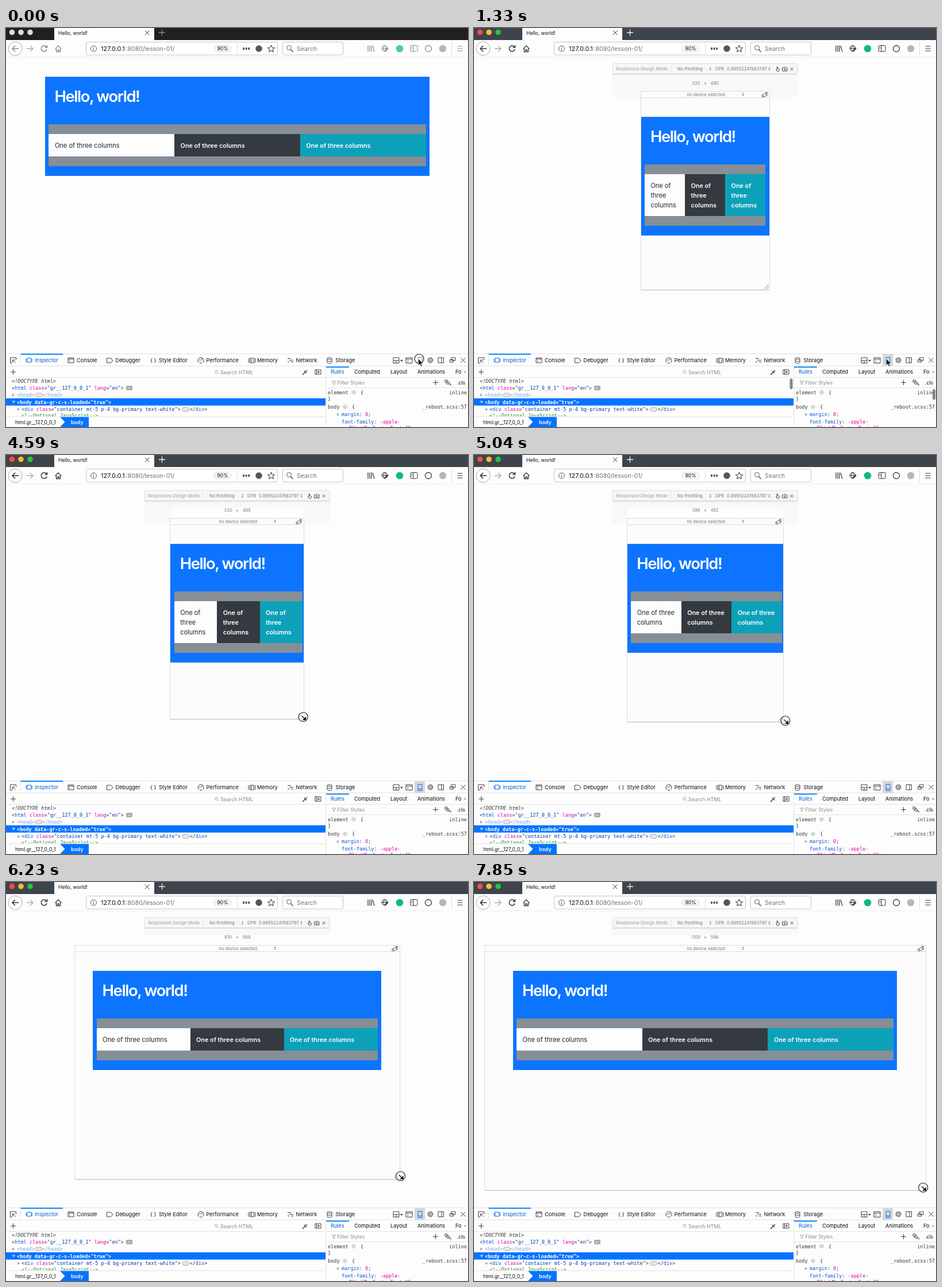
These frames come from a looping animation (804x696 px, 8000 ms). An HTML page:

```html
<!DOCTYPE html>
<html lang="en">
<head>
<meta charset="utf-8">
<title>Responsive design mode</title>
<style>
html, body { margin: 0; width: 100%; height: 100%; overflow: hidden; background: #fdfdfd; }
#stage { display: block; width: 804px; height: 696px; }
text { font: 9.2px Inter, sans-serif; white-space: pre; fill: #0c0c0d; }
.mono text { font: 8.53px "DejaVu Sans Mono", monospace; fill: #38383d; }
.mono .b { font-weight: 700; fill: #fff; }
.i { fill: none; stroke: currentColor; stroke-width: 1; stroke-linejoin: round; }
.f { fill: currentColor; stroke: none; }
.tag { fill: #0a52d9; }
.attr { fill: #dd00a9; }
.val { fill: #003eaa; }
.dim { opacity: .5; }
.grey { fill: #8a8a8d; }
.url text { font-size: 10.5px; }
#rdm text { font-size: 7.5px; fill: #77777a; }
#page text { font-size: 10.8px; fill: #fff; font-weight: 600; }
#page .lead { font-size: 27.4px; letter-spacing: -1.4px; font-optical-sizing: none; }
#page .ink { font-size: 11.05px; fill: #212529; font-weight: 400; }
</style>
</head>
<body>
<svg id="stage" viewBox="0 0 804 696">
  <rect width="804" height="696" fill="#fdfdfd"/>

  <!-- title bar -->
  <rect id="bar" width="804" height="21"/>
  <rect x="84" width="174" height="21" fill="#fdfdfd"/>
  <g id="lights">
    <circle cx="10.5" cy="7.5" r="4.8"/><circle cx="26" cy="7.5" r="4.8"/><circle cx="42" cy="7.5" r="4.8"/>
  </g>
  <text x="91" y="11.8" style="font-size:8.6px">Hello, world!</text>
  <path class="i" color="#333" d="M242 4.5l7.5 7.5m0-7.5L242 12"/>
  <path id="plus" fill="none" stroke-width="1.3" d="M271.5 2.5v11M266 8h11"/>

  <!-- navigation bar -->
  <path d="M0 50.5H804" stroke="#efefef"/>
  <g class="i">
    <g stroke="#c4c4c6">
      <rect x="139.5" y="24.5" width="333" height="22.5" rx="2.5" fill="#fff"/>
      <rect x="481.5" y="24.5" width="105" height="22.5" rx="2.5" fill="#fff"/>
      <path d="M402.5 27v18M775.5 24v24" stroke="#ddd"/>
      <rect x="361.5" y="30" width="30.5" height="11.5" rx="5.7" fill="#f5f5f6" stroke="#e0e0e2"/>
      <circle cx="16" cy="36" r="12" fill="#fff" stroke="#a8a8aa"/>
    </g>
    <path d="M36 36h11m-5-5l5 5-5 5" stroke="#ababad" stroke-width="1.3"/>
    <g color="#555">
      <circle cx="152.5" cy="36" r="5"/><path d="M152.5 35v4M152.5 32.8v1.2"/>
      <path class="f" d="M412 36a1.6 1.6 0 1 0 3 0a1.6 1.6 0 1 0-3 0m4.6 0a1.6 1.6 0 1 0 3 0a1.6 1.6 0 1 0-3 0m4.6 0a1.6 1.6 0 1 0 3 0a1.6 1.6 0 1 0-3 0"/>
      <circle class="f" cx="440" cy="36" r="5.8"/>
      <path d="M461.5 30l1.8 4 4.3.4-3.3 2.9 1 4.3-3.8-2.3-3.8 2.3 1-4.3-3.3-2.9 4.3-.4z" stroke-width="1.2"/>
      <circle cx="492.5" cy="34.5" r="4"/><path d="M495.5 37.5l4 4.5" stroke-width="1.5"/>
    </g>
    <g id="tools">
      <path d="M22 36H11m5-5l-5 5 5 5" stroke-width="1.6"/>
      <path d="M70.4 33a5 5 0 1 0 .7 4.2M71.5 30v4h-4" stroke-width="1.5"/>
      <path d="M85.5 36.5l5.5-5.5 5.5 5.5M87.5 36v5.5h2.5v-3.5h2v3.5h2.5V36" stroke-width="1.3"/>
      <path d="M630 30.5v11M633 30.5v11M636 30.5v11M638 31l3 10.5" stroke-width="1.2"/>
      <circle cx="659" cy="35.5" r="5"/><path d="M654 35.5h10M659 30.5c-3 3-3 7 0 10M659 30.5c3 3 3 7 0 10"/><path d="M659 41l6-6" stroke-width="2"/>
      <rect x="704" y="30.5" width="12" height="10.5" rx="1.5"/><path d="M709 30.5v10.5M705.5 33.5h2M705.5 36h2"/>
      <circle cx="735" cy="36" r="5.5" stroke-width="1.3"/>
      <path d="M785.5 32h9M785.5 36h9M785.5 40h9" stroke-width="1.2"/>
    </g>
  </g>
  <circle id="green" cx="685" cy="36" r="6.3" fill="#10b981"/>
  <circle cx="760" cy="36" r="6.2" fill="#b6b6b8"/>
  <g class="url">
    <text x="165" y="39.8" style="font-size:11px">127.0.0.1</text>
    <text x="208.5" y="39.8" style="fill:#6f6f72">:8080/lesson-01/</text>
    <text x="377" y="39" text-anchor="middle" style="font-size:8.5px">90%</text>
    <text x="506" y="39.8" style="fill:#737376">Search</text>
  </g>

  <!-- responsive toolbar -->
  <rect id="ghost" x="68" y="85" width="669" height="483"/>
  <g id="rdm">
    <rect x="241" y="80" width="322.5" height="40.5" fill="#f8f8f8"/>
    <rect id="wipe" y="93" height="28" fill="#fdfdfd"/>
    <rect x="241" y="80" width="322.5" height="2" fill="#e6e6e6"/>
    <rect x="241.5" y="62" width="321.5" height="17.5" rx="1" fill="#f7f7f8" stroke="#dcdcde"/>
    <path d="M342.5 65.5v11" stroke="#ddd"/>
    <text x="247" y="74" style="fill:#9b9b9e">Responsive Design Mode</text>
    <text x="354" y="74">No throttling</text>
    <text x="420" y="74">DPR</text>
    <text x="440" y="74" style="font-size:7.7px">0.89552241563797</text>
    <g class="f" color="#777"><path d="M409.7 70.5l1.6-2.2 1.6 2.2zM409.7 72l1.6 2.2 1.6-2.2zM512.4 70.5l1.6-2.2 1.6 2.2zM512.4 72l1.6 2.2 1.6-2.2z"/></g>
    <g class="i" color="#4a4a4e" stroke-width=".9">
      <path d="M527 73v-5h1.5v3l3 .8v1.7l-1 2h-3l-2-3z"/>
      <path d="M536.5 69.5h2l1-1h3l1 1h1.5v5.5h-8.5z"/><circle cx="540.8" cy="72" r="1.4"/>
      <path d="M550.5 69l5 5m0-5l-5 5"/>
    </g>
    <g text-anchor="middle">
      <text id="wide" x="386.5" y="99"></text><text x="402.5" y="99">×</text><text id="high" x="418.7" y="99"></text>
    </g>
    <rect id="frame" y="110.5" fill="#fcfcfc" stroke="#dcdcde"/>
    <path id="edges" fill="none" stroke="#dcdcde"/>
    <path id="shade" stroke="#d0d0d2" stroke-width="1.6"/>
    <text x="403.7" y="119" text-anchor="middle">no device selected</text>
    <path class="f" color="#777" d="M466.6 115l1.6-2.2 1.6 2.2zM466.6 116.5l1.6 2.2 1.6-2.2z"/>
    <g id="turn" class="i" color="#66666a"><rect x="-3.5" y="-1" width="6" height="4" transform="rotate(-20)"/><path d="M0-3h4v5M-5 0v4h3M2-4.5l3 1.5"/></g>
  </g>
  <svg id="view"><g id="page"></g></svg>
  <path id="grip" class="i" color="#8a8a8d" d="M-8 0l8-8M-4 0l4-4"/>

  <!-- developer tools -->
  <rect y="568" width="804" height="128" fill="#fdfdfd"/>
  <path d="M0 568.5H804M0 589.5H804M0 609.5H555M557 609.5H804M557 627.5H804M556.5 590V696" stroke="#e2e2e4"/>
  <rect x="25.5" y="568" width="73.5" height="2" fill="#0a84ff"/>
  <rect x="557" y="590.5" width="40" height="2" fill="#0a84ff"/>
  <path d="M25.5 572v15" stroke="#e2e2e4"/>
  <rect id="hover" x="711" y="569" width="18" height="21" fill="#d5d8dc"/>
  <text x="50" y="583" style="fill:#0060df">Inspector</text>
  <text x="123" y="583">Console</text>
  <text x="190.5" y="583">Debugger</text>
  <text x="251" y="583">{ }</text>
  <text x="266" y="583">Style Editor</text>
  <text x="348.5" y="583">Performance</text>
  <text x="437" y="583">Memory</text>
  <text x="504.5" y="583">Network</text>
  <text x="573.5" y="583">Storage</text>
  <g class="i" color="#3c3c40">
    <path d="M11 584.5H7.5v-9.5h10v4M11.5 579l5 5m-5-5v4m0-4h4"/>
    <path d="M36.5 576h7.5v7h-7.5zM34 578.5h2.5M44 578.5h2.5M34 581h2.5M44 581h2.5" stroke="#0060df"/>
    <path d="M108 575.5h10v8.5h-10zM108 577.5h10M110 579.5l1.5 1.5-1.5 1.5"/>
    <path d="M175.5 576h7l3.5 4-3.5 4h-7z"/>
    <path d="M342.5 583.5a5 5 0 1 0-7 0M339 580l3-4M336 579h2M337 584.5h4"/>
    <path d="M424.5 576h7v8h-7zM422 576v8M434 576v8M427 577v6"/>
    <path d="M490 576.5h6M493 579.5h7M490 582.5h3M496 582.5h4"/>
    <path d="M559 576.5c0-2 8-2 8 0v7c0 2-8 2-8 0zM559 576.5c0 2 8 2 8 0M559 580c0 2 8 2 8 0"/>
    <path d="M674 575h10v9.5h-10zM674 580h10M679 580v4.5"/><path class="f" d="M686 579h5l-2.5 3z"/>
    <path d="M696 575h11v9.5h-11zM696 577.5h11M698.5 579.5l1.5 1.5-1.5 1.5"/>
    <circle cx="738.5" cy="579.5" r="3.7"/><circle cx="738.5" cy="579.5" r="1.5"/>
    <circle cx="738.5" cy="579.5" r="4.7" stroke-dasharray="1.8 1.89"/>
    <path d="M752 575h9.5v9h-9.5zM758 575v9"/>
    <path d="M775 575h7v5h-7zM772.5 578.5h6v4.5h-6z"/>
    <path d="M791.5 575.5l8 8m0-8l-8 8"/>
    <path d="M12.5 595.5v9M8 600h9M747.5 614v9M743 618.5h9"/>
    <path d="M516 605l5-5M519 598l4 4M522 599l2-2" stroke-width="1.5"/>
    <path d="M538 596h10v8h-10zM540.5 596v8M543 598l3 2-3 2z"/>
    <path d="M764 614h4v4h-4zM767 617h4v4h-4zM770 621h4v3"/>
    <g color="#a5a5a8"><circle cx="366" cy="599.5" r="2.5"/><path d="M368 601.5l2 2M567 616h7l-2.5 3v3l-2-1v-2z"/>
      <circle cx="605" cy="635.5" r="3.5" stroke-dasharray="1.5 1.2"/><circle cx="605" cy="635.5" r="1.8"/>
      <circle cx="590" cy="661" r="3.5" stroke-dasharray="1.5 1.2"/><circle cx="590" cy="661" r="1.8"/>
      <path class="f" d="M796.5 599h5l-2.5 3zM11 637.5v5.5l4-2.7zM20 662.5v5.5l4-2.7zM576 671.5v5.5l4-2.7z"/></g>
  </g>
  <path id="phone" class="i" d="M717 574.5h7v11h-7zM717 582.5h7M720 584h1"/>
  <text class="grey" x="373" y="603.5" style="font-size:8.9px">Search HTML</text>
  <text x="565" y="603.3" style="fill:#0060df">Rules</text>
  <text x="606" y="603.3">Computed</text>
  <text x="669" y="603.3">Layout</text>
  <text x="716" y="603.3">Animations</text>
  <text x="782" y="603.3">Fo</text>
  <text class="grey" x="576.5" y="622" style="font-size:8.6px">Filter Styles</text>
  <text x="785" y="621.5" style="font-size:8.6px">.cls</text>

  <g class="mono">
    <rect y="646" width="556" height="12.6" fill="#0573ff"/>
    <path d="M10 650.5h6.5l-3.2 4.5z" fill="#9cc8ff"/>
    <text x="10" y="619" style="font-style:italic">&lt;!DOCTYPE html&gt;</text>
    <text x="10" y="631">&lt;<tspan class="tag">html</tspan> <tspan class="attr">class</tspan>="<tspan class="val">gr__127_0_0_1</tspan>" <tspan class="attr">lang</tspan>="<tspan class="val">en</tspan>"&gt;</text>
    <rect x="209" y="624" width="11" height="8" rx="2" fill="#a9a9ac"/>
    <text x="211.5" y="630" style="font-size:5px;fill:#fff">ev</text>
    <g class="dim">
      <text x="19" y="643">&lt;<tspan class="tag">head</tspan>&gt;</text>
      <text x="63" y="643">&lt;/<tspan class="tag">head</tspan>&gt;</text>
    </g>
    <text class="b" x="19" y="655.5">&lt;body data-gr-c-s-loaded="true"&gt;</text>
    <text x="27" y="668">&lt;<tspan class="tag">div</tspan> <tspan class="attr">class</tspan>="<tspan class="val">container mt-5 p-4 bg-primary text-white</tspan>"&gt;</text>
    <text x="319.5" y="668">&lt;/<tspan class="tag">div</tspan>&gt;</text>
    <g fill="#f4f4f5" stroke="#8a8a8d" stroke-width=".8">
      <rect x="51.5" y="637" width="11" height="6.5" rx="3"/><rect x="307" y="662" width="11" height="6.5" rx="3"/>
      <path d="M54 640.3h6M309.5 665.3h6" stroke-dasharray="1.2 1.2"/>
    </g>
    <text x="27" y="679.3" style="fill:#2a8a1d">&lt;!--Optional JavaScript--&gt;</text>
    <rect y="677.5" width="555" height="19" fill="#fdfdfd"/>
    <path d="M0 678H555" stroke="#e2e2e4"/>
    <text x="560" y="638.5">element</text><text x="617" y="638.5">{</text>
    <text x="802" y="638.5" text-anchor="end">inline</text>
    <text x="560" y="649.5">}</text>
    <text x="560" y="664">body</text><text x="602" y="664">{</text>
    <text x="802" y="664" text-anchor="end">_reboot.scss:57</text>
    <text x="584" y="677"><tspan class="tag">margin</tspan>: <tspan class="attr">0</tspan>;</text>
    <text x="584" y="689.5"><tspan class="tag">font-family</tspan>: <tspan class="attr">-apple-</tspan></text>
    <text x="597" y="700.5" style="fill:#dd00a9">BlinkMacSystemFont,"S</text>
  </g>
  <text x="16" y="690.7" style="font-size:8.5px">html.gr__127_0_0_1</text>
  <path d="M94 678.5h50V696H94l8.5-8.8z" fill="#0573ff"/>
  <text x="113" y="690.7" style="font-size:8.8px;font-weight:600;fill:#fff">body</text>
  <g id="bars" fill="#85858a">
    <rect x="549.5" y="611.5" width="5" height="18.5" rx="2.5"/><rect x="798" y="630" width="5" height="18.5" rx="2.5"/>
  </g>

  <!-- pointer -->
  <circle id="ring" r="8" fill="#fff" fill-opacity=".4" stroke="#111" stroke-width="1.1"/>
  <path id="arrow" d="M0 0v11.5l2.7-2.5 2 4.4 2-.9-2-4.3h3.7z" fill="#000" stroke="#fff" stroke-width=".8"/>
  <path id="sizer" d="M-2.5-2L4 4.5M4.5 .5v4.500h-4.500z" fill="#000" stroke="#000" stroke-width="1.1"/>
</svg>

<script>
const LOOP = 8000, STEP = LOOP / 54, S = 0.6965, MID = 402.1, LINE = 17;
const el = id => document.getElementById(id);
const set = (id, attrs) => { for (const a in attrs) el(id).setAttribute(a, attrs[a]); };
const show = (id, on) => set(id, { visibility: on ? "visible" : "hidden" });
const at = (id, x, y) => set(id, { transform: `translate(${x} ${y})` });

// device widths from step 29 on
const WIDTHS = [320, 322, 332, 348, 366, 388, 425, 473, 527, 592, 655, 712, 764,
  810, 850, 900, 947, 985, 1015, 1040, 1060, 1075, 1087, 1095, 1100];
// [step, value...]
const HEIGHTS = [[29, 480], [34, 492], [37, 522], [42, 568], [45, 583], [53, 596]];
const GRAB = [[29, -4, -4], [34, 4, -1.5], [37, 4, -4], [42, 1.5, -5], [45, -2, -5], [53, -4.3, -4]];
const PATH = [[0, 717.5, 577], [16, 717.5, 577], [17, 719, 578], [18, 721.5, 580.5], [19, 721.5, 580.5],
  [20, 724.5, 585], [21, 724.5, 585], [22, 721, 578], [23, 717, 570], [24, 695, 549],
  [25, 655, 520], [26, 608, 494], [27, 560, 473], [28, 525, 460], [29, 510, 453]];

function pick(keys, k) {
  let i = 0;
  while (i < keys.length - 2 && keys[i + 1][0] <= k) i++;
  const [a, b] = [keys[i], keys[i + 1]];
  const p = Math.min(1, Math.max(0, (k - a[0]) / (b[0] - a[0])));
  return a.slice(1).map((v, j) => v + (b[j + 1] - v) * p);
}

const widthAt = k => WIDTHS[Math.min(24, Math.max(0, k - 29))];

// rectangle with its sides snapped to whole pixels
function box(x, y, w, h, fill) {
  const l = Math.round(x), r = Math.round(x + w);
  return `<rect x="${l}" y="${y}" width="${r - l}" height="${h}" fill="${fill}"/>`;
}

// page laid out like a fixed-width grid container, in stage coordinates
function layout(left, y, css) {
  const cw = S * (css >= 992 ? 960 : css >= 768 ? 720 : css >= 576 ? 540 : css);
  const x = left + (css * S - cw) / 2;
  const rx = x + 9 * S, rw = cw - 18 * S, col = rw / 3, room = col - 30 * S;
  const lines = room > 112 ? ["One of three columns"]
    : room > 65.5 ? ["One of three", "columns"] : ["One of", "three", "columns"];
  const ch = 22 + LINE * lines.length, row = ch + 2 * LINE;
  const cols = ["#fdfdfd", "#343a40", "#0da1b9"].map((fill, i) => {
    const cx = rx + col * i;
    return box(cx, y + 100, col, ch, fill) + lines.map((s, j) =>
      `<text class="${i ? "" : "ink"}" x="${cx + 15 * S}" y="${y + 123.6 + j * LINE}">${s}</text>`).join("");
  });
  return box(x, y, cw, 100 + row, "#0d74ff") +
    `<text class="lead" x="${x + 24 * S - .5}" y="${y + 43.5}">Hello, world!</text>` +
    box(rx, y + 83, rw, row, "#868e96") + cols.join("");
}

function draw(k) {
  const active = k >= 1, device = k >= 8, drag = k >= 30;
  set("bar", { fill: active ? "#3d444b" : "#202021" });
  ["#fc4b45", "#fdbc2e", "#2ac33f"].forEach((c, i) =>
    el("lights").children[i].setAttribute("fill", active ? c : "#dcdcdc"));
  set("plus", { stroke: active ? "#f4f4f4" : "#8a8a8a" });
  set("tools", { color: active ? "#333336" : "#8a8a8d" });
  set("green", { opacity: active ? 1 : .75 });
  show("hover", k >= 2);
  set("phone", { color: k >= 3 ? "#0a6be8" : "#3c3c40" });
  show("ghost", k >= 3 && !device);
  set("ghost", { fill: k === 3 ? "#f5f5f5" : "#f9f9f9" });
  set("bars", { opacity: [.6, 1, 1, .8, .4][k - 8] || 0 });

  const w = widthAt(k), h = Math.round(pick(HEIGHTS, k)[0]);
  const start = MID - w * S / 2, left = Math.round(start);
  const right = Math.ceil(start + w * S), low = Math.ceil(121.5 + h * S);
  show("rdm", device);
  show("grip", device);
  if (device) {
    el("wide").textContent = w;
    el("high").textContent = h;
    set("wipe", { x: left, width: drag ? right - left : 0 });
    set("frame", { x: left - .5, width: right - left + 1, height: low - 110 });
    set("edges", { d: `M${left} 121.5H${right}` });
    set("shade", { d: `M${left} ${low + 1}H${right + .5}` });
    at("turn", right - 8, 116);
    at("grip", right - 1, low - 1);
  }

  // the page reflows slightly ahead of the frame while dragging
  const css = drag && w < 560 ? Math.min(w + 7, widthAt(k + 1)) : w;
  const [x, y, vw, vh] = device ? [left, 122, right - left, low - 122] : [0, 51, 804, 517];
  set("view", { x, y, width: vw, height: vh, viewBox: `${x} ${y} ${vw} ${vh}` });
  el("page").innerHTML = k < 3 ? layout(.5, 85, 804 / S) : k > 8 ? layout(start, 155, css) : "";

  const sizing = k >= 29;
  show("ring", k === 0 || drag);
  show("arrow", !sizing);
  show("sizer", sizing);
  if (sizing) {
    const [dx, dy] = pick(GRAB, k);
    at("ring", right + dx, low + dy);
    at("sizer", right + dx, low + dy);
  } else {
    at("arrow", ...pick(PATH, k));
    at("ring", 719, 577);
  }
}

let last = -1;
function tick() {
  const t = performance.now() % LOOP;
  const k = Math.min(53, Math.floor((t + 9) / STEP));
  if (k !== last) draw(last = k);
  requestAnimationFrame(tick);
}
tick();
</script>
</body>
</html>
```
